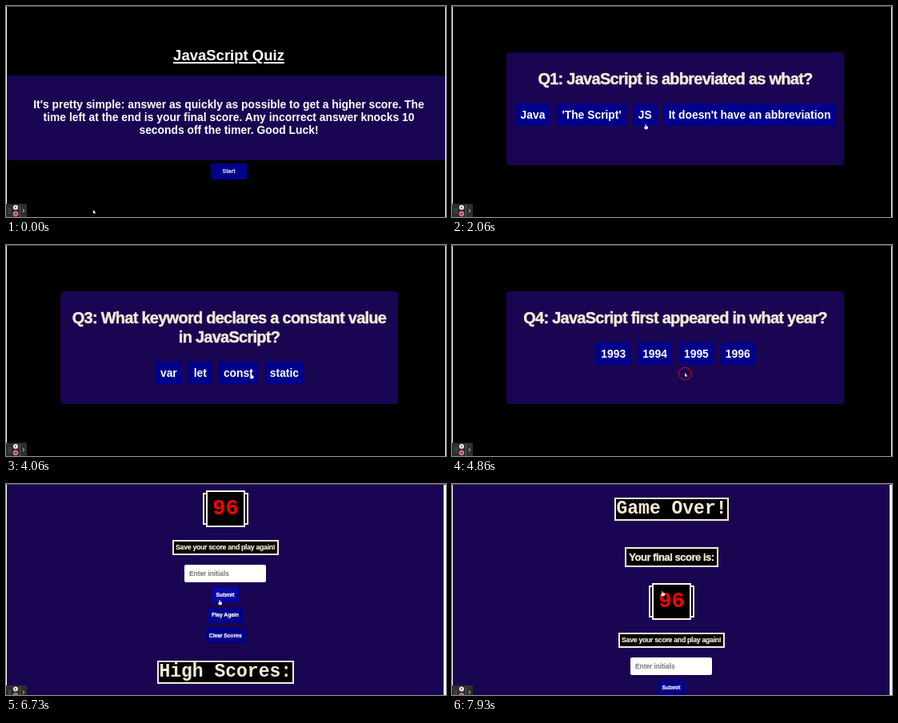
An HTML page for the animation above (8 s loop, 550 by 264 pixels).

```html
<!DOCTYPE html>
<html lang="en">
<head>
<meta charset="utf-8">
<title>JavaScript Quiz</title>
<style>
  html, body { margin: 0; width: 100%; height: 100%; overflow: hidden; background: #000; }
  #stage { position: relative; width: 550px; height: 264px; overflow: hidden; background: #000;
    font: bold 13.87px "Liberation Sans", Arial, sans-serif; color: #fff; text-align: center; }
  #stage div, #stage svg { position: absolute; box-sizing: border-box; white-space: nowrap; }
  .band, .card, #over { background: #190552; }
  .card { border-radius: 4px; }
  .intro { line-height: 15.9px; }
  .heading { font-size: 18.5px; text-decoration: underline; text-decoration-thickness: 1.5px; text-underline-offset: 1.5px; }
  .question, .final, .save { letter-spacing: -.037em; -webkit-text-stroke: .022em; }
  .question { font-size: 20px; line-height: 24px; color: #faebd7; }
  .final { font-size: 13px; }
  .save { font-size: 8.8px; }
  #stage .row { display: flex; justify-content: center; gap: 8.4px; }
  #stage .row .btn { position: static; padding: 0 6.3px; line-height: 28px; height: 28px; }
  .btn { background: #00008b; border-radius: 2px; }
  .btn.hover { background: #0808a2; }
  .start { font-size: 7px; }
  .small { font-size: 6.9px; letter-spacing: -.1px; -webkit-text-stroke: .2px; }
  .plate { background: #000; border: 2px solid #faebd7; color: #faebd7; }
  .mono { font-family: "Liberation Mono", "Courier New", monospace; font-size: 23px; }
  .score { font-size: 27px; color: #f00; border-color: #fff5e8; }
  #stage .input { background: #fff; color: #757575; border-radius: 2px; font-size: 8.5px; letter-spacing: -.1px;
    text-align: left; padding-left: 6px; }
  .edge { background: #fff; }
  #overlay { left: 0; top: 0; pointer-events: none; }
</style>
</head>
<body>
<div id="stage"></div>
<script>
const LOOP = 8000;
const HOVER_LAG = 110;
const stage = document.getElementById('stage');

function box(parent, cls, x, y, w, h, text = '') {
  const el = document.createElement('div');
  el.className = cls;
  el.textContent = text;
  Object.assign(el.style, { left: x + 'px', top: y + 'px', width: w + 'px', height: h + 'px' });
  if (text.includes('\n')) {
    el.style.whiteSpace = 'pre';
  } else if (text) {
    const border = cls.includes('plate') ? 4 : 0;
    el.style.lineHeight = h - border + 'px';
  }
  parent.append(el);
  return el;
}
const layer = () => box(stage, '', 0, 0, 550, 264);

function makeIntro() {
  const page = layer();
  box(page, 'heading', 178, 51, 201, 22, 'JavaScript Quiz');
  box(page, 'band', 1, 87, 548, 106);
  box(page, 'intro', 1, 116, 555, 48,
    "It's pretty simple: answer as quickly as possible to get a higher score. The\n" +
    'time left at the end is your final score. Any incorrect answer knocks 10\n' +
    'seconds off the timer. Good Luck!');
  box(page, 'btn start', 256, 197, 45, 20, 'Start');
  return page;
}

function makeQuestion([title, ...answers]) {
  const page = layer();
  const lines = title.split('\n').length;
  box(page, 'card', 68, 58, 422, 141);
  box(page, 'question', 68, 79, 422, 24 * lines, title);
  const row = box(page, 'row', 68, 98 + 24 * lines, 423, 28);
  for (const answer of answers) {
    const btn = document.createElement('div');
    btn.className = 'btn';
    btn.textContent = answer;
    row.append(btn);
  }
  return page;
}

function makeOver() {
  const page = layer();
  box(page, '', 1, 0, 546, 264).id = 'over';
  box(page, 'edge', 547, 0, 3, 264);
  const sheet = box(page, '', 0, 0, 547, 380);
  box(sheet, 'plate mono', 203, 17, 143, 29, 'Game Over!');
  box(sheet, 'plate final', 216, 79, 117, 25, 'Your final score is:');
  box(sheet, 'plate score', 246, 127, 57, 40);
  box(sheet, 'plate mono score', 250, 124, 49, 46, '96');
  box(sheet, 'plate save', 207.5, 186, 133.5, 19, 'Save your score and play again!');
  box(sheet, 'input', 223, 217, 102, 22, 'Enter initials');
  box(sheet, 'btn small', 257, 245, 34, 19, 'Submit');
  box(sheet, 'btn small', 252, 271, 44, 18.5, 'Play Again');
  box(sheet, 'btn small', 249.5, 296, 49.5, 19, 'Clear Scores');
  box(sheet, 'plate mono', 189, 336.5, 170.5, 29.5, 'High Scores:');
  return { page, sheet };
}

const questions = [
  ['Q1: JavaScript is abbreviated as what?', 'Java', "'The Script'", 'JS', "It doesn't have an abbreviation"],
  ['Q2: If HTML is the skeleton and CSS is the\nskin, what is JavaScript?', 'The muscles', 'The microbiota', 'The brain', 'The soul'],
  ['Q3: What keyword declares a constant value\nin JavaScript?', 'var', 'let', 'const', 'static'],
  ['Q4: JavaScript first appeared in what year?', '1993', '1994', '1995', '1996']
];
const over = makeOver();
const scenes = [
  [0, makeIntro()],
  [1730, layer()],
  ...[1800, 2730, 3730, 4800].map((start, i) => [start, makeQuestion(questions[i])]),
  [5730, over.page]
];

box(stage, 'edge', 0, 0, 1, 264);
box(stage, 'edge', 549, 0, 1, 264);
box(stage, '', 0, 0, 550, 1).style.background = '#484848';

stage.insertAdjacentHTML('beforeend', `
<svg id="overlay" width="550" height="264">
  <g id="recorder">
    <path d="M0 0H26V18H0Z" fill="#2e2e30"/>
    <path d="M17.5 1V17" stroke="#555"/>
    <path d="M3.5 6V12M5.5 6V12" stroke="#888" stroke-width=".8" stroke-dasharray="1 1.4"/>
    <circle cx="12" cy="4.5" r="3" fill="#eee"/>
    <path d="M11 3L13.3 4.5L11 6Z" fill="#555"/>
    <circle cx="12" cy="12.5" r="2.7" fill="#d33b46" stroke="#e9c9c9" stroke-width=".8"/>
    <path d="M21 6.7L22.8 8.7L21 10.7" fill="none" stroke="#ddd"/>
  </g>
  <circle id="ring" fill="none" stroke="#b00020" stroke-width="1.2"/>
  <g id="cursor">
    <path id="arrow" d="M0 0V4.6L1.1 3.7L1.8 5.2L2.6 4.9L2 3.4H3.3Z" fill="#fff"/>
    <path id="hand" d="M-.6 .4Q0-.4 .6 .4V2.2L2.7 2.8Q3.2 3.1 3 3.9L2.4 6.2H-.6L-2.2 3.9Q-2 3.1-.6 3.9Z" fill="#fff"/>
  </g>
</svg>`);
const [recorder, ring, cursor, arrow, hand] =
  ['recorder', 'ring', 'cursor', 'arrow', 'hand'].map(id => document.getElementById(id));
const buttons = [...document.querySelectorAll('.btn')];

// time, x, y
const path = [
  [0, 109, 255], [130, 109, 255], [930, 279, 208], [1730, 279, 209], [2060, 242, 148],
  [2760, 241, 146], [3050, 339, 163], [3760, 338, 163], [4250, 291, 160], [4930, 291, 160],
  [5330, 304, 141], [5760, 304, 141], [6130, 274, 147], [6600, 267, 145], [7000, 267, 145],
  [7300, 264, 134], [8000, 263, 134]
];
// time, scroll offset
const scroll = [[0, 0], [6200, 0], [6630, 116], [7040, 116], [7800, 0], [8000, 0]];
const clicks = [1700, 2690, 3690, 4790, 5690];

const ease = p => p * p * (3 - 2 * p);
function sample(keys, t) {
  const i = Math.max(1, keys.findIndex(k => k[0] > t));
  const a = keys[i - 1], b = keys[i];
  const p = ease((t - a[0]) / (b[0] - a[0]));
  return a.slice(1).map((v, j) => v + (b[j + 1] - v) * p);
}
const under = point => document.elementFromPoint(...point);

function draw(t) {
  const current = scenes.filter(([start]) => start <= t).pop()[1];
  for (const [, page] of scenes) page.style.display = page === current ? '' : 'none';

  const [offset] = sample(scroll, t);
  over.sheet.style.transform = `translateY(${-offset}px)`;
  recorder.setAttribute('transform', `translate(0 ${t < 5730 ? 247.5 : 252})`);

  const [x, y] = sample(path, t);
  cursor.setAttribute('transform', `translate(${x} ${y})`);
  const hovered = under(sample(path, Math.max(0, t - HOVER_LAG)));
  for (const btn of buttons) btn.classList.toggle('hover', btn === hovered);
  const pointing = t > 6600 || buttons.includes(under([x, y]));
  hand.style.display = pointing ? '' : 'none';
  arrow.style.display = pointing ? 'none' : '';

  const click = clicks.find(c => t >= c && t < c + 300);
  ring.style.display = click === undefined ? 'none' : '';
  if (click !== undefined) {
    const age = t - click;
    const [cx, cy] = sample(path, click);
    ring.setAttribute('cx', cx);
    ring.setAttribute('cy', cy + 1);
    ring.setAttribute('r', Math.min(7.7, 3 + age / 14));
    ring.setAttribute('opacity', Math.min(1, (300 - age) / 200));
  }
}

const began = performance.now();
function tick() {
  draw((performance.now() - began) % LOOP);
  requestAnimationFrame(tick);
}
tick();
</script>
</body>
</html>
```
